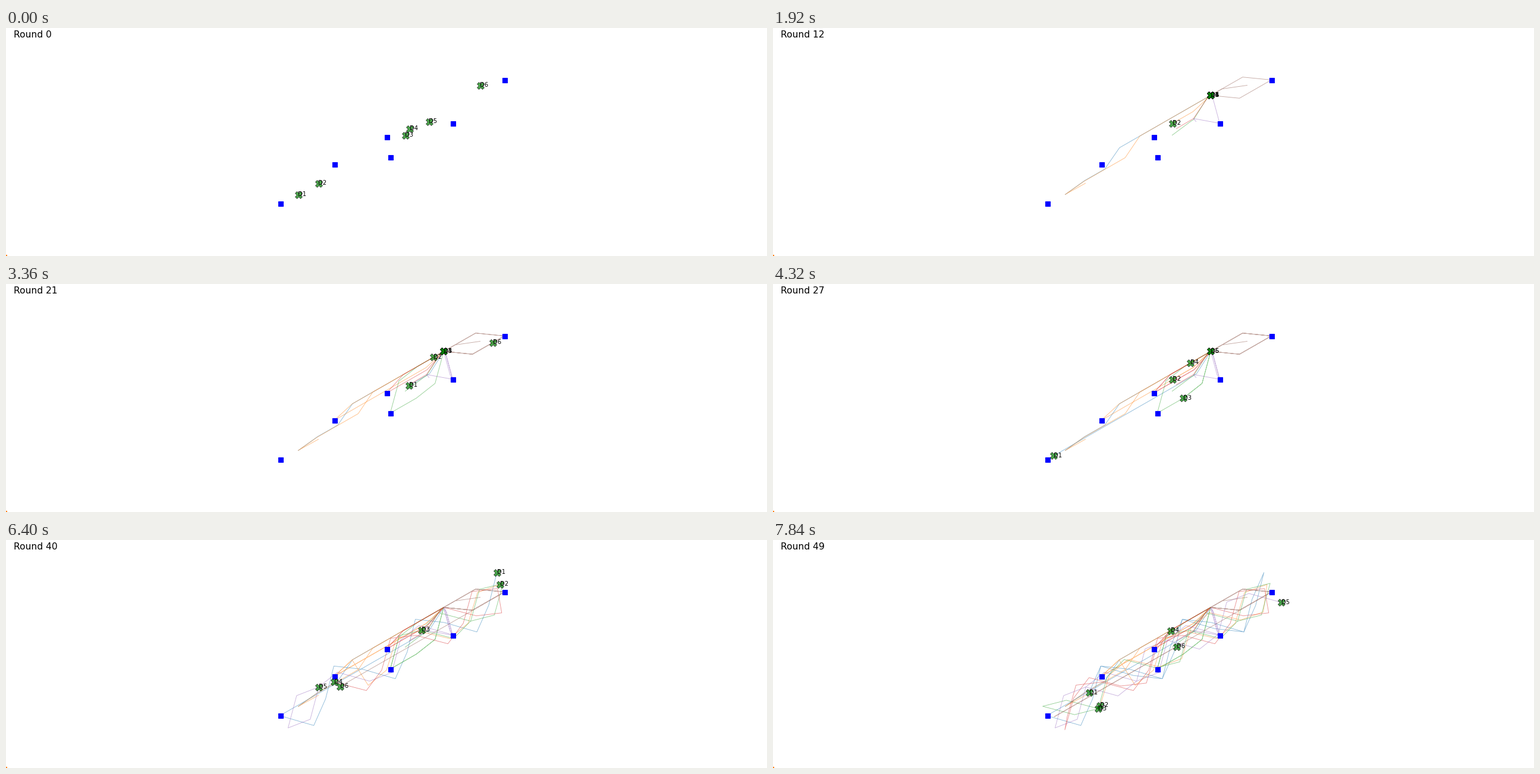
Animation, 1280 px wide and 384 px high, one loop 8 s. Source, as a matplotlib script:

```python
import numpy as np
import matplotlib.pyplot as plt
from matplotlib.animation import FuncAnimation
from matplotlib.patches import Rectangle
from matplotlib.transforms import IdentityTransform

W, H, DPI = 1280, 384, 80
ROUNDS, INTERVAL = 50, 160
HUB = (737, 114)

# The drones fly in a frame tilted along the line of stations.
U, V = 0.867, 0.498
TILT = np.array([[U, -V], [-V, -U]])   # its own inverse, up to rounding
STEP = 39.55                           # reach per round on each tilted axis
WEST, MID, LEGS = 254, -494.5, 11      # patrol strip: start, centre line, length in steps


class Drone:
    """Flies an opening route to the hub, shuttles to its station, then patrols."""

    def __init__(self, station, route, departs, patrol_from, shift, wave):
        self.station, self.route, self.departs = station, route, departs
        self.patrol_from, self.shift, self.wave = patrol_from, shift, wave

    def patrol(self, r):
        """Bounce between the strip's ends while weaving across it every 4 rounds."""
        leg = (r - self.shift) % (2 * LEGS)
        along = WEST + STEP * min(leg, 2 * LEGS - leg)
        turn = np.pi / 2 * r
        across = MID + self.wave[0] * np.cos(turn) + self.wave[1] * np.sin(turn)
        return TILT @ (along, across)

    def path(self):
        pos = TILT @ self.route[0]
        goals = [TILT @ p for p in [*self.route[1:], HUB]]
        points = [self.route[0]]
        for r in range(1, ROUNDS):
            if r >= self.patrol_from:
                points.append(self.patrol(r))
                continue
            if r - 1 in self.departs:
                goals = [TILT @ self.station, TILT @ HUB]
            if goals:
                pos = pos + np.clip(goals[0] - pos, -STEP, STEP)
                if np.allclose(pos, goals[0], atol=2):
                    goals.pop(0)
            points.append(TILT @ pos)
        return np.array(points)


drones = [
    Drone((462, 296), [(492, 281), (559, 238)], [19], 29, 29, (35, 6)),
    Drone((553, 230), [(526, 262), (492, 281), (593, 219)], [10, 25], 33, 29.14, (15, -22)),
    Drone((647, 218), [(672, 181), (708, 155)], [13, 25], 31, 25, (14, -25)),
    Drone((641, 184), [(679, 170), (708, 153)], [15, 22], 30, 20.68, (11, 28)),
    Drone((752, 161), [(712, 158), (708, 153), (752, 161)], [13, 27], 30, 16, (17, -23)),
    Drone((839, 88), [(798, 97)], [5, 12, 19, 28], 32, 20.8, (0, 0)),
]
paths = [d.path() for d in drones]

plt.rcParams["font.family"] = "DejaVu Sans"
fig = plt.figure(figsize=(W / DPI, H / DPI), dpi=DPI, facecolor="white")
ax = fig.add_axes([0, 0, 1, 1])
ax.set_xlim(0.5, W + 0.5)
ax.set_ylim(H + 0.5, 0.5)
ax.axis("off")

ax.add_patch(Rectangle((0, 0), 2, 2, color="tab:orange", lw=0,
                       transform=IdentityTransform()))
ax.plot(*zip(*[d.station for d in drones]), "s", color="blue", ms=7.6, mew=1, zorder=3)
title = ax.text(0.01, 0.958, "", fontsize=14, transform=ax.transAxes)

trails, marks, labels = [], [], []
for i in range(len(drones)):
    trails += ax.plot([], [], color=f"C{i}", lw=0.8, alpha=0.5, zorder=2)
    marks += ax.plot([], [], "X", mfc="green", mec="black", ms=10, mew=0.7,
                     alpha=0.7, zorder=4)
    labels.append(ax.text(0, 0, f"D{i + 1}", fontsize=9, va="center", zorder=5))


def update(n):
    title.set_text(f"Round {n}")
    for path, trail, mark, label in zip(paths, trails, marks, labels):
        trail.set_data(*path[:n + 1].T)
        x, y = path[n]
        mark.set_data([x], [y])
        label.set_position((x, y - 0.5))
    return [title, *trails, *marks, *labels]


anim = FuncAnimation(fig, update, frames=ROUNDS, interval=INTERVAL,
                     init_func=lambda: update(0), repeat=True, repeat_delay=0)
plt.show()
```
